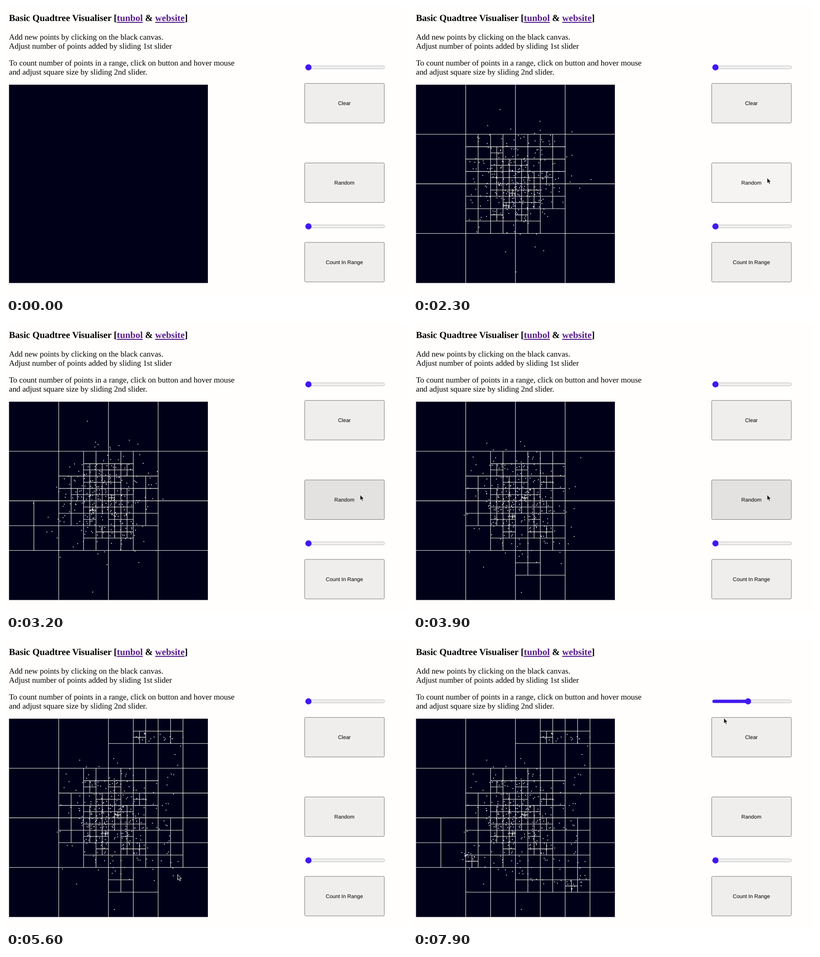
Animation, 880 px wide and 636 px high, one loop 8 s. Source, as an HTML page:

```html
<!DOCTYPE html>
<html lang="en">
<head>
<meta charset="utf-8">
<title>Basic Quadtree Visualiser</title>
<style>
  html, body { margin: 0; width: 100%; height: 100%; overflow: hidden; background: #fffefd; }
  svg { display: block; width: 880px; height: 636px; text-rendering: geometricPrecision; }
  .copy { font: 17.47px "Liberation Serif", "Times New Roman", serif; }
  .title { font-size: 20.43px; font-weight: bold; }
  .link { fill: #551a8b; text-decoration: underline; }
  .label { font: 11.65px "Liberation Sans", Arial, sans-serif; text-anchor: middle; }
  .button { fill: #efeeed; stroke: #767676; }
  .track { fill: #efefef; stroke: #b5b5b5; stroke-width: .9; }
  .blue { fill: #4318f3; }
</style>
</head>
<body>
<svg viewBox="0 0 880 636" xmlns="http://www.w3.org/2000/svg">
  <rect width="880" height="636" fill="#fffefd"/>
  <g class="copy">
    <text class="title" x="6.4" y="33">Basic Quadtree Visualiser [<tspan class="link">tunbol</tspan> &amp; <tspan class="link">website</tspan>]</text>
    <text x="6.4" y="74.3">Add new points by clicking on the black canvas.</text>
    <text x="6.4" y="93.9">Adjust number of points added by sliding 1st slider</text>
    <text x="6.4" y="131">To count number of points in a range, click on button and hover mouse</text>
    <text x="6.4" y="150.6">and adjust square size by sliding 2nd slider.</text>
  </g>
  <rect x="6.6" y="173.2" width="436.4" height="436.4" fill="#000019"/>
  <path id="lines" fill="none" stroke="#f2f2ec" stroke-width="1.1"/>
  <path id="dots" fill="none" stroke="#fff" stroke-width="2" stroke-linecap="round"/>
  <g id="controls"></g>
  <path id="cursor" d="M0 0V12.3L2.9 9.8L4.9 14.2L7 13.2L5.1 9H8.8Z" fill="#1a1a1a" stroke="#fff" stroke-width=".9" stroke-linejoin="round"/>
</svg>
<script>
const LOOP = 8000, STEP = 100;
const LEFT = 6.6, TOP = 173.2, SIDE = 436.4, CAPACITY = 5;
const $ = id => document.getElementById(id);

// Controls
const button = (y, name) => `
  <rect id="${name.split(' ')[0]}" class="button" x="655.5" y="${y}" width="174.7" height="87" rx="2"/>
  <text class="label" x="742.6" y="${y + 47.4}">${name}</text>`;
const slider = (y, id) => `
  <rect class="track" x="657.5" y="${y - 3.3}" width="173.2" height="6.6" rx="3.3"/>
  <rect id="${id}Fill" class="blue" x="657" y="${y - 3.6}" width="7" height="7.2" rx="3.6"/>
  <circle id="${id}Thumb" class="blue" cx="663.8" cy="${y}" r="6.7"/>`;
$('controls').innerHTML = slider(135, 'amount') + button(170.4, 'Clear') +
  button(345.4, 'Random') + slider(485, 'size') + button(520.2, 'Count In Range');

function seeded(seed) {
  return () => {
    seed = (seed * 1664525 + 1013904223) >>> 0;
    return seed / 4294967296;
  };
}

// Time and place of the pointer at its turns
const path = [
  [1100, 845, 291], [1300, 777, 378], [4400, 777, 378], [4880, 292, 208], [5060, 330, 217],
  [5220, 378, 220], [5300, 365, 293], [5450, 356, 420], [5600, 376.5, 516], [5700, 362, 536],
  [5840, 345, 541], [5960, 270, 533], [6100, 165, 490], [6200, 112, 478], [6440, 126, 476],
  [6700, 630.5, 206], [6900, 662, 147], [7200, 666, 134], [7700, 735, 152], [7900, 682, 171.5]];

function pointer(t) {
  const next = path.findIndex(key => key[0] > t);
  if (next < 1) return path[next ? path.length - 1 : 0].slice(1);
  const [t0, x0, y0] = path[next - 1], [t1, x1, y1] = path[next];
  const f = (t - t0) / (t1 - t0);
  return [x0 + (x1 - x0) * f, y0 + (y1 - y0) * f];
}

// A normal cloud of points; even steps of radius keep its spread steady.
function cloud(cx, cy, seed, count = 300) {
  const rand = seeded(seed);
  return Array.from({ length: count }, (_, i) => {
    const r = Math.sqrt(-2 * Math.log((i + .5) / count)), a = 2 * Math.PI * rand();
    return [cx + 50 * r * Math.cos(a), cy + 56 * r * Math.sin(a)];
  });
}

const clicks = [
  { down: 1700, up: 1800, points: cloud(228, 385, 41) },
  { down: 2300, up: 2500, points: cloud(215, 396, 7) },
  { down: 3100, up: 3200, points: cloud(215, 394, 93) },
  { down: 3800, up: 3900, points: cloud(230, 393, 18) }];

// Points dropped near the pointer while it is dragged over the canvas
const drops = [];
const scatter = seeded(5);
for (let from = 4880; from < 6460; from += 20) {
  const [x, y] = pointer(from);
  drops.push({ from, point: [x + 22 * (scatter() - .5), y + 22 * (scatter() - .5)] });
}

// Path of the crosses that part every cell holding more points than it may
function divide(points, x = LEFT, y = TOP, size = SIDE) {
  if (points.length <= CAPACITY || size < 10) return '';
  const half = size / 2, mx = x + half, my = y + half;
  const part = (right, low) => divide(
    points.filter(p => (p[0] >= mx) === right && (p[1] >= my) === low),
    right ? mx : x, low ? my : y, half);
  return `M${mx} ${y}v${size}M${x} ${my}h${size}` +
    part(false, false) + part(true, false) + part(false, true) + part(true, true);
}

function buttonFill(t, x, y) {
  if (clicks.some(c => t >= c.down && t < c.up)) return '#f5f4f3';
  const over = x > 655 && x < 831 && y > 345 && y < 433;
  return over && t >= path[0][0] ? '#e4e2e1' : '#efeeed';
}

function draw(t) {
  const click = clicks.filter(c => t >= c.up).pop();
  const added = drops.filter(d => t >= d.from).map(d => d.point);
  const points = [...(click ? click.points : []), ...added];
  $('lines').setAttribute('d', divide(points));
  $('dots').setAttribute('d', points.map(([x, y]) => `M${x} ${y}h.01`).join(''));

  const drag = Math.min(1, Math.max(0, (t - 7100) / 600));
  const thumb = 663.8 + 71.5 * drag;
  $('amountThumb').setAttribute('cx', thumb);
  $('amountFill').setAttribute('width', thumb - 657);

  const [x, y] = pointer(t);
  $('Random').style.fill = buttonFill(t, x, y);
  $('cursor').setAttribute('transform', `translate(${x} ${y})`);
  $('cursor').style.display = t < path[0][0] ? 'none' : '';
}

const start = performance.now();
let shown = -1;
function tick() {
  const t = Math.floor((performance.now() - start) % LOOP / STEP) * STEP;
  if (t !== shown) draw(shown = t);
  requestAnimationFrame(tick);
}
tick();
</script>
</body>
</html>
```
